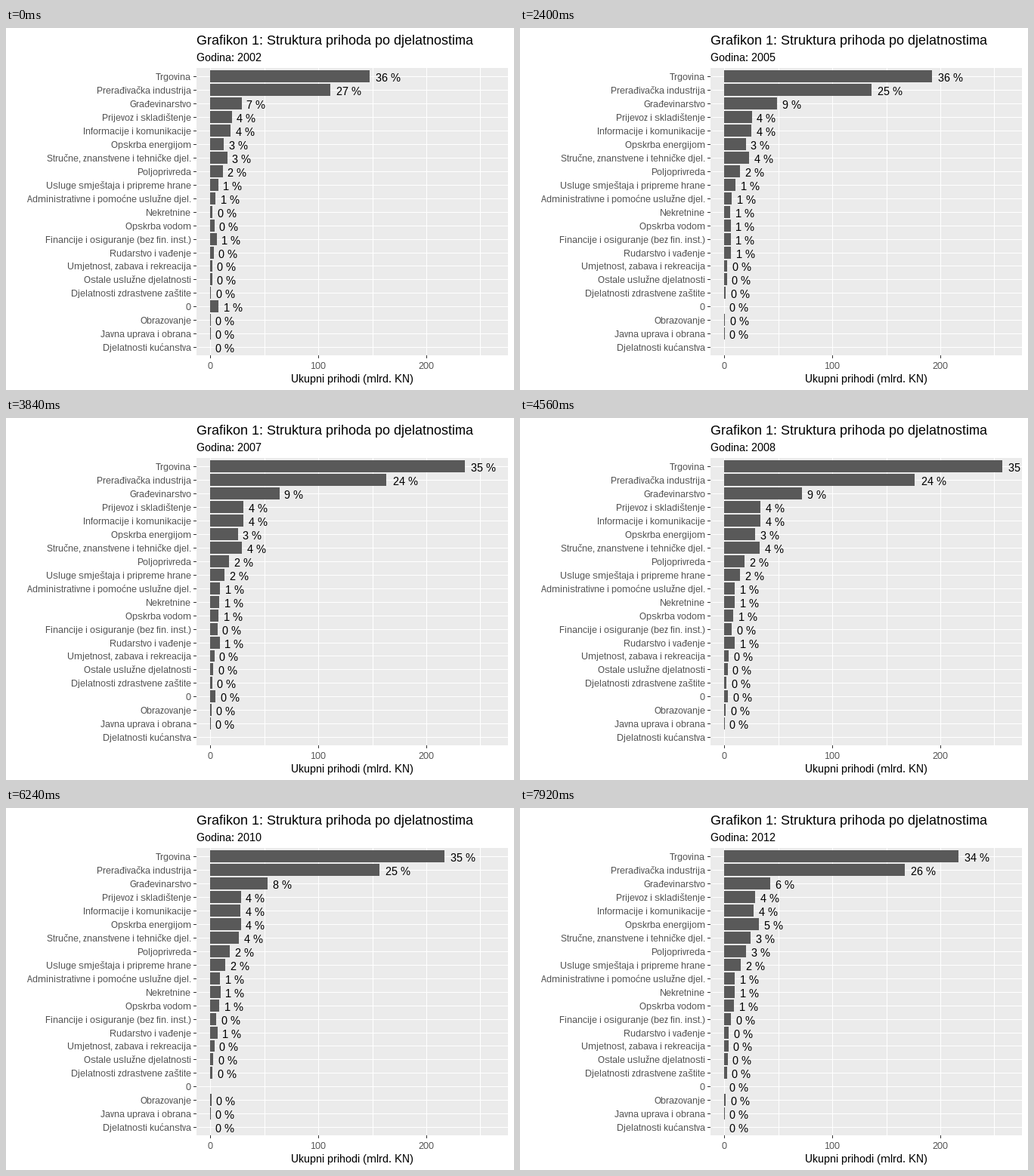
A matplotlib script for the animation above (8 s loop, 672 px wide and 480 px high).

```python
import matplotlib.pyplot as plt
import numpy as np
from matplotlib.animation import FuncAnimation
from matplotlib.patches import Rectangle

plt.rcParams.update({
    "font.family": "Liberation Sans",
    "text.hinting": "native",
    "text.hinting_factor": 1,
})

W, H, DPI = 672, 480, 96
TICK, STEP, LOOP = 40, 120, 8000
STEPS_PER_YEAR = 6.6
LEFT, RIGHT, TOP, BOTTOM = 252, 664, 53, 434
ZERO, UNIT = 270.8, 1.4284
ROW0, PITCH, HALF = 64.95, 17.93, 7.96

# Length of the trade bar in pixels at its turning points.
TRADE = {2002: 211, 2003: 245, 2005: 274, 2008: 376,
         2009: 320.5, 2010: 308, 2012: 310}

# Length of the other bars at the start, in the middle and at the end.
KEYS = (2002, 2009, 2012)
SECTORS = {
    "Prerađivačka industrija": (159, 217, 239),
    "Građevinarstvo": (41.5, 93, 61),
    "Prijevoz i skladištenje": (28.5, 41.5, 40.7),
    "Informacije i komunikacije": (27, 42, 38.7),
    "Opskrba energijom": (18, 36.6, 45.7),
    "Stručne, znanstvene i tehničke djel.": (22.5, 41.5, 35),
    "Poljoprivreda": (16.5, 23.5, 29),
    "Usluge smještaja i pripreme hrane": (10.5, 18.7, 21.7),
    "Administrativne i pomoćne uslužne djel.": (6.7, 12.5, 14),
    "Nekretnine": (2.8, 13, 14),
    "Opskrba vodom": (5.4, 10.8, 13),
    "Financije i osiguranje (bez fin. inst.)": (8.5, 8, 8.7),
    "Rudarstvo i vađenje": (4.5, 13, 6),
    "Umjetnost, zabava i rekreacija": (2.5, 5.3, 5.3),
    "Ostale uslužne djelatnosti": (2.4, 4, 4.4),
    "Djelatnosti zdrastvene zaštite": (1, 2.6, 3.5),
    "0": (0, 0, 0),
    "Obrazovanje": (0.5, 1.5, 1.7),
    "Javna uprava i obrana": (0.3, 0.5, 0.5),
    "Djelatnosti kućanstva": (0, 0, 0),
}
NAMES = ["Trgovina", *SECTORS]
UNSORTED, HOMES = NAMES.index("0"), len(NAMES) - 1


def trade(year):
    return np.interp(year, list(TRADE), list(TRADE.values()))


RATIOS = np.array(list(SECTORS.values())) / trade(KEYS)


def lengths(year):
    """Trade sets the common rise and fall, eased ratios set each sector."""
    seg, frac = divmod(np.interp(year, KEYS, (0, 1, 2)), 1)
    pos = seg + frac ** 0.6
    ratios = [np.interp(pos, (0, 1, 2), r) for r in RATIOS]
    out = trade(year) * np.array([1, *ratios])
    out[UNSORTED] = np.interp(year, (2002, 2003, 2006, 2007, 2009),
                              (11, 0, 0, 8, 0))
    return out


def shares(year):
    values = lengths(year)
    return (100 * values / values.sum()).astype(int)


def shown(row, year):
    if row == UNSORTED:
        return not 2008.1 < year < 2010.9
    if row == HOMES:
        return not 2002 < year < 2008.9
    return True


fig = plt.figure(figsize=(W / DPI, H / DPI), dpi=DPI, facecolor="white")
ax = fig.add_axes([0, 0, 1, 1])
ax.set_xlim(0, W)
ax.set_ylim(H, 0)
ax.axis("off")


def box(x0, y0, x1, y1, color, z=1):
    patch = Rectangle((x0, y0), x1 - x0, y1 - y0, facecolor=color,
                      linewidth=0, antialiased=False, zorder=z)
    return ax.add_patch(patch)


def write(x, y, text, px, color="black", ha="left"):
    return ax.text(x, y, text, fontsize=px * 72 / DPI, color=color,
                   ha=ha, va="baseline", zorder=5)


panel = box(LEFT, TOP, RIGHT, BOTTOM, "#EBEBEB")

for value in range(0, 251, 50):
    x = int(ZERO + value * UNIT)
    box(x, TOP, x + 1, BOTTOM, "white", 2)
    if value % 100 == 0:
        box(x, BOTTOM, x + 1, BOTTOM + 4, "#333333", 2)
        write(x, 452, str(value), 12, "#4D4D4D", "center")

bars, labels = [], []
for i, name in enumerate(NAMES):
    c = ROW0 + PITCH * i
    y = int(c)
    box(LEFT, y, RIGHT, y + 1, "white", 2)
    box(LEFT - 4, y, LEFT, y + 1, "#333333", 2)
    write(245, y + 5, name, 12, "#4D4D4D", "right")
    bars.append(box(int(ZERO), int(c - HALF), int(ZERO), int(c + HALF),
                    "#595959", 3))
    label = write(ZERO, y + 7, "", 15)
    label.set_clip_on(True)
    label.set_clip_path(panel)
    labels.append(label)

write(252, 22, "Grafikon 1: Struktura prihoda po djelatnostima", 18)
subtitle = write(252, 44, "", 15)
write(458, 470, "Ukupni prihodi (mlrd. KN)", 15, ha="center")


def update(i):
    year = 2002 + (i * TICK // STEP) / STEPS_PER_YEAR
    subtitle.set_text(f"Godina: {round(year)}")
    rows = zip(bars, labels, lengths(year), shares(round(year)))
    for row, (bar, label, length, share) in enumerate(rows):
        end = ZERO + length
        width = int(end) - int(ZERO)
        visible = shown(row, year)
        bar.set_width(width)
        bar.set_visible(visible and width > 0)
        label.set_visible(visible)
        label.set_text(f"{share} %")
        label.set_x(round(end + (7.6 if share > 9 else 6.1)))
    return [subtitle, *bars, *labels]


anim = FuncAnimation(fig, update, frames=LOOP // TICK, interval=TICK,
                     repeat=True, repeat_delay=0, blit=False)
plt.show()
```
